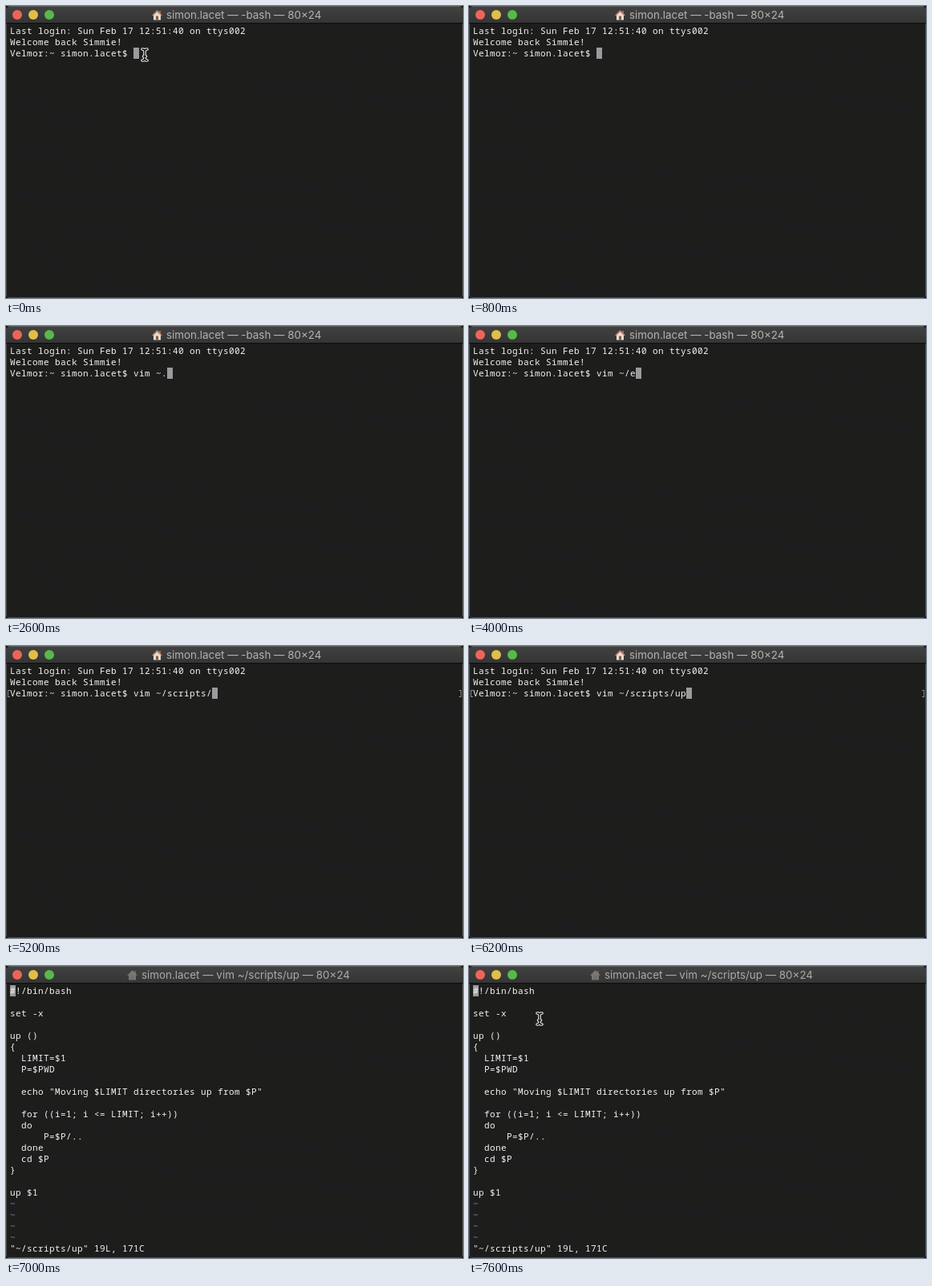
An HTML page with a canvas that plays this animation: 570 by 365 pixels, repeating every 8 s.

```html
<!DOCTYPE html>
<html lang="en">
<head>
<meta charset="utf-8">
<title>Terminal session</title>
<style>
html, body { margin: 0; width: 570px; height: 365px; overflow: hidden; background: #111; }
canvas { display: block; }
</style>
</head>
<body>
<canvas id="stage" width="570" height="365"></canvas>
<script>
const W = 570, H = 365, LOOP = 8000;
const CELL = 7, LINE = 14, LEFT = 5, TOP = 24;
const MONO = '500 11px "Noto Sans Mono", "DejaVu Sans Mono", monospace';
const SANS = '13.4px Inter, "Liberation Sans", sans-serif';
const USER = 'simon.lacet';
const PROMPT = 'Velmor:~ ' + USER + '$ ';
const ctx = document.getElementById('stage').getContext('2d');

// [start time, command line]
const typing = [
  [0, ''], [1000, 'v'], [1200, 'vi'], [1400, 'vim'], [1600, 'vim '],
  [2400, 'vim ~'], [2600, 'vim ~.'], [3000, 'vim ~'], [3200, 'vim ~/'],
  [4000, 'vim ~/e'], [4200, 'vim ~/'], [4400, 'vim ~/s'], [4600, 'vim ~/sc'],
  [4800, 'vim ~/scr'], [5000, 'vim ~/scripts/'], [6000, 'vim ~/scripts/u'],
  [6200, 'vim ~/scripts/up']
];

const script = `#!/bin/bash

set -x

up ()
{
  LIMIT=$1
  P=$PWD

  echo "Moving $LIMIT directories up from $P"

  for ((i=1; i <= LIMIT; i++))
  do
      P=$P/..
  done
  cd $P
}

up $1
~
~
~
~
"~/scripts/up" 19L, 171C`.split('\n');

function box(x, y, w, h, color) {
  ctx.fillStyle = color;
  ctx.fillRect(x, y, w, h);
}

function disc(x, y, color) {
  ctx.fillStyle = color;
  ctx.beginPath();
  ctx.arc(x, y, 6, 0, Math.PI * 2);
  ctx.fill();
}

function poly(points, color) {
  ctx.fillStyle = color;
  ctx.beginPath();
  points.forEach(([x, y]) => ctx.lineTo(x, y));
  ctx.fill();
}

function print(text, row, color = '#f4f4f4') {
  ctx.font = MONO;
  ctx.fillStyle = color;
  [...text].forEach((ch, i) => {
    if (ch !== ' ') ctx.fillText(ch, LEFT + i * CELL, TOP + row * LINE + 11);
  });
}

function block(col, row) {
  box(LEFT + col * CELL, TOP + row * LINE, CELL, LINE, '#9c9a9c');
}

// Dim slanted marks showing through the translucent window
function makeBackdrop() {
  const layer = document.createElement('canvas');
  layer.width = W;
  layer.height = H;
  const c = layer.getContext('2d');
  let seed = 17;
  const rand = () => (seed = (seed * 16807) % 2147483647) / 2147483647;
  c.fillStyle = '#1d1d1c';
  c.fillRect(0, 0, W, H);
  c.strokeStyle = 'rgba(31, 31, 58, 0.42)';
  c.lineWidth = 2;
  const bands = [
    [285, 92, 560, 130], [420, 55, 560, 82], [8, 125, 118, 142],
    [8, 182, 490, 238], [8, 236, 520, 282], [85, 282, 510, 340],
    [8, 280, 75, 335], [110, 350, 230, 364]
  ];
  for (const [x1, y1, x2, y2] of bands) {
    for (let x = x1; x < x2; x += 7 + rand() * 7) {
      const y = y1 + (y2 - y1) * (x - x1) / (x2 - x1) + rand() * 8 - 4;
      const h = 4 + rand() * 11;
      c.beginPath();
      c.moveTo(x, y + h / 2);
      c.lineTo(x + h * 0.6, y - h / 2);
      c.stroke();
    }
  }
  return layer;
}
const backdrop = makeBackdrop();

function house(x, dim) {
  ctx.globalAlpha = dim ? 0.55 : 1;
  box(x + 9, 6, 2, 4, dim ? '#8a8480' : '#a5654f');
  poly([[x + 2, 11], [x + 6.5, 6.5], [x + 11, 11], [x + 11, 17.5], [x + 2, 17.5]],
    dim ? '#aaa7a4' : '#e6ded2');
  poly([[x, 11.5], [x + 6.5, 5], [x + 13, 11.5], [x + 11.5, 12.3], [x + 6.5, 7.6], [x + 1.5, 12.3]],
    dim ? '#918d8a' : '#b9816b');
  box(x + 5, 12.5, 3, 5, dim ? '#6a6663' : '#8d5a40');
  ctx.globalAlpha = 1;
}

function titleBar(busy) {
  const g = ctx.createLinearGradient(0, 0, 0, 21);
  g.addColorStop(0, '#414142');
  g.addColorStop(1, '#353536');
  box(0, 0, W, 21, g);
  box(4, 0, W - 8, 1, '#606061');
  box(0, 21, W, 1, '#0d0d0d');
  disc(14, 11, '#ed6559');
  disc(34, 11, '#e0be4a');
  disc(54, 11, '#57b94a');
  house(busy ? 151 : 182, busy);
  ctx.font = SANS;
  ctx.fillStyle = busy ? '#aaaaaa' : '#b3b3b3';
  const job = busy ? 'vim ~/scripts/up' : '-bash';
  ctx.fillText(`${USER} — ${job} — 80×24`, busy ? 169 : 200, 16);
}

function frameEdge() {
  ctx.strokeStyle = '#4b4b4b';
  ctx.lineWidth = 1;
  ctx.beginPath();
  ctx.moveTo(0.5, 22);
  ctx.lineTo(0.5, H - 4);
  ctx.quadraticCurveTo(0.5, H - 0.5, 4, H - 0.5);
  ctx.lineTo(W - 4, H - 0.5);
  ctx.quadraticCurveTo(W - 0.5, H - 0.5, W - 0.5, H - 4);
  ctx.lineTo(W - 0.5, 22);
  ctx.stroke();
  for (const [x, y, dx, dy] of [[0, 0, 1, 1], [W, 0, -1, 1], [0, H, 1, -1], [W, H, -1, -1]]) {
    poly([[x, y], [x + 3 * dx, y], [x, y + 3 * dy]], '#101010');
  }
}

function beam(x, y) {
  ctx.lineCap = 'round';
  for (const [width, color] of [[3.6, '#f2f2f2'], [1.4, '#111111']]) {
    ctx.lineWidth = width;
    ctx.strokeStyle = color;
    ctx.beginPath();
    for (const s of [-1, 1]) {
      ctx.moveTo(x - 3, y + 7 * s);
      ctx.quadraticCurveTo(x, y + 7 * s, x, y + 4.5 * s);
      ctx.quadraticCurveTo(x, y + 7 * s, x + 3, y + 7 * s);
    }
    ctx.moveTo(x, y - 5);
    ctx.lineTo(x, y + 5);
    ctx.moveTo(x - 1.5, y + 2);
    ctx.lineTo(x + 1.5, y + 2);
    ctx.stroke();
  }
  ctx.lineCap = 'butt';
}

function shell(t) {
  const command = typing.filter(([at]) => at <= t).pop()[1];
  print('Last login: Sun Feb 17 12:51:40 on ttys002', 0);
  print('Welcome back Simmie!', 1);
  block(PROMPT.length + command.length, 2);
  print(PROMPT + command, 2);
  if (t >= 5200) {
    for (const [x, lip] of [[2, 2], [567, 565]]) {
      box(x, 55, 1, 9, '#858585');
      box(lip, 55, 3, 1, '#858585');
      box(lip, 63, 3, 1, '#858585');
    }
  }
  if (t < 800) {
    const k = t / 800;
    beam(173 + 10 * k * k, 61 + 46 * k * k);
  }
}

function editor(t) {
  block(0, 0);
  script.forEach((line, row) => print(line, row, line === '~' ? '#8585c4' : undefined));
  if (t >= 7400) {
    const k = Math.min(1, (t - 7400) / 200);
    beam(94 - 6 * k, 72 - 6 * k);
  }
}

function draw(now) {
  const t = Math.floor((now % LOOP) / 200) * 200;
  ctx.drawImage(backdrop, 0, 0);
  titleBar(t >= 6800);
  (t < 6600 ? shell : editor)(t);
  frameEdge();
}

let start;
function tick(now) {
  start ??= now;
  draw(now - start);
  requestAnimationFrame(tick);
}
draw(0);
requestAnimationFrame(tick);
</script>
</body>
</html>
```
